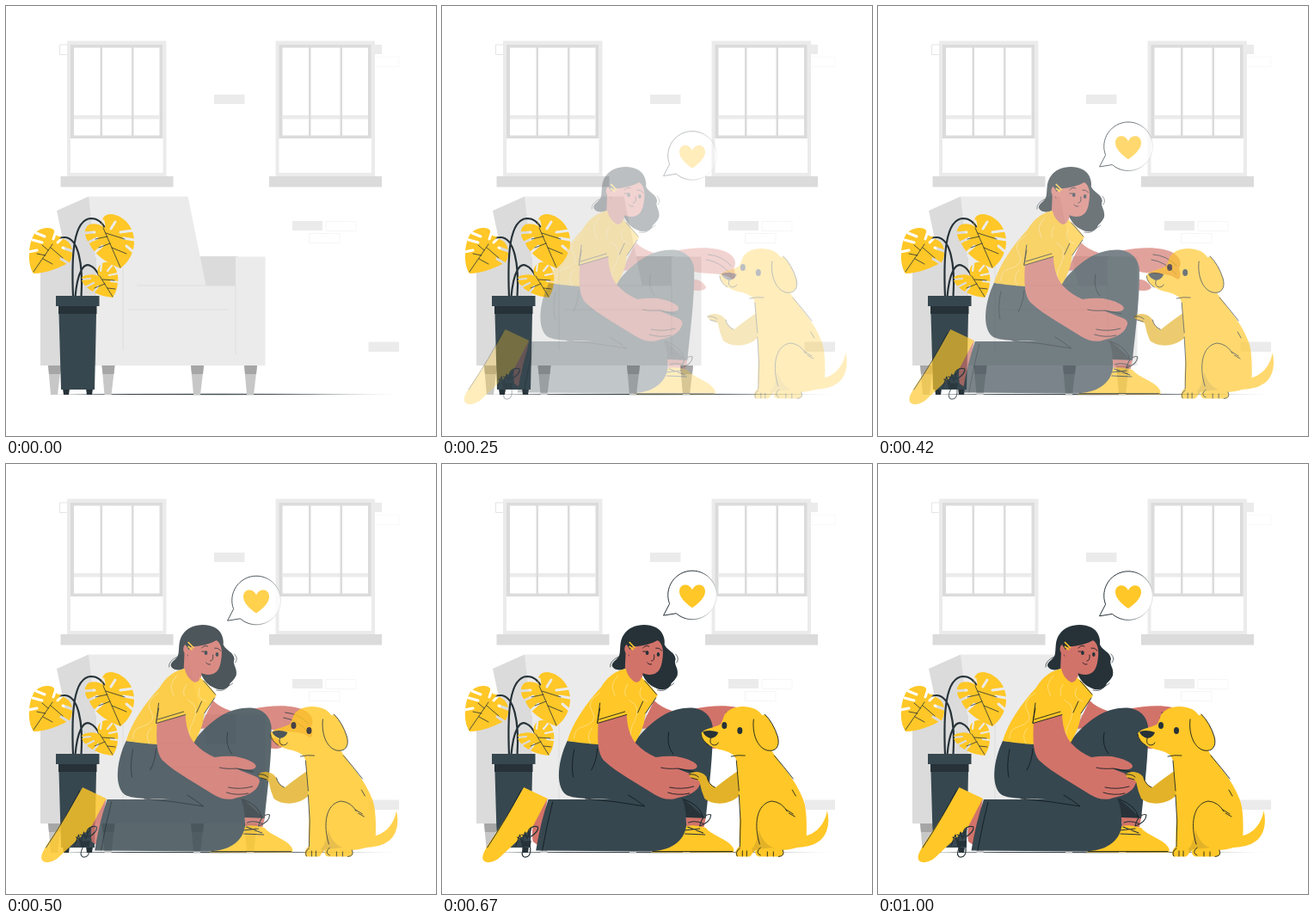
Recreate the animation shown at these times as an HTML page. Size 500 px wide and 500 px high, loop 1040 ms.

```html
<!DOCTYPE html>
<html lang="en">
<head>
<meta charset="utf-8">
<title>Woman and dog</title>
<style>
html, body { margin: 0; width: 100%; height: 100%; overflow: hidden; background: #fff; }
svg { display: block; width: 100%; height: 100%; }
.pale { fill: #ebebeb; }
.grey { fill: #dbdbdb; }
.dark { fill: #263238; }
.slate { fill: #37474f; }
.sun { fill: #ffc727; }
.shade { fill: #e3b228; }
.skin { fill: #d2736a; }
.line, .ink, .print, .edge { fill: none; stroke-linecap: round; stroke-linejoin: round; }
.line { stroke: #263238; }
.ink { stroke: #101a1f; stroke-width: .85; }
.print { stroke: #ffe08a; stroke-width: .8; }
.edge { stroke: #dbdbdb; stroke-width: .8; }
.clip { fill: none; stroke: #ffc727; stroke-width: 1.7; }
</style>
</head>
<body>
<svg viewBox="0 0 500 500">
<defs>
  <linearGradient id="fade">
    <stop stop-color="#dedede"/><stop offset="1" stop-color="#f8f8f8"/>
  </linearGradient>
  <linearGradient id="rim" gradientUnits="userSpaceOnUse" x1="257" y1="140" x2="321" y2="160">
    <stop offset=".5" stop-color="#263238"/><stop offset=".95" stop-color="#e0e2e3"/>
  </linearGradient>
  <linearGradient id="floor">
    <stop stop-color="#263238" stop-opacity=".15"/><stop offset=".12" stop-color="#263238"/>
    <stop offset=".65" stop-color="#263238" stop-opacity=".8"/><stop offset="1" stop-color="#263238" stop-opacity=".1"/>
  </linearGradient>
  <g id="window">
    <path class="pale" d="M71 40.500H186.500V198H71z"/>
    <path fill="#fff" d="M75 154H182.500V194H75z"/>
    <path class="grey" d="M75 45H182V154H75zM63.500 198H194.500V210.500H63.500z"/>
    <path fill="#fff" d="M79 48.500H178.500V150.500H79z"/>
    <path class="pale" d="M79 127H178.500V131.500H79z"/>
    <path class="grey" d="M109.500 48H112V151H109.500zM146 48H148.500V151H146z"/>
  </g>
  <g id="foot">
    <path fill="#c7c7c7" d="M0 418H15L11 452H3z"/>
    <path fill="#a6a6a6" d="M0 418H15L14 428H1z"/>
  </g>
  <!-- slits cut out of the leaves -->
  <mask id="slits" maskUnits="userSpaceOnUse" x="0" y="220" width="170" height="140">
    <path fill="#fff" d="M0 220H170V360H0z"/>
    <g fill="none" stroke="#000" stroke-width="3" stroke-linecap="round">
      <path d="M31 272L42 275M26 286L36 284M35 264L45 268M58 262L55 271M66 269L60 275M77 285L66 281M72 299L64 294"/>
      <path d="M90 264L103 263M93 276L106 270M103 287L112 279M148 261L133 263M149 272L137 270M147 285L140 279M113 250L114 256M127 251L122 259"/>
      <path stroke-width="2.200" d="M88 318L98 317M92 327L102 322M101 334L107 326M130 311L120 313M130 321L122 320M111 300L110 308M123 302L118 308"/>
    </g>
  </mask>
</defs>

<!-- room -->
<path class="pale" d="M242 103H277.500V114H242zM333 250H368V261H333zM428 45H437V56H428zM421.500 390.500H457V402H421.500z"/>
<path fill="none" stroke="url(#fade)" stroke-width=".8" d="M372 250.500H407V261.500H372zM352.500 264.500H388V275.500H352.500zM428 59H457V70.500H428zM62.500 45H73V56.500H62.500z"/>
<use href="#window"/><use href="#window" x="242.500"/>
<path fill="url(#floor)" d="M42 451.500Q250 450 457 451.500Q250 453 42 451.500z"/>

<!-- armchair -->
<use href="#foot" x="49"/><use href="#foot" x="111.500"/><use href="#foot" x="215"/><use href="#foot" x="277"/>
<path class="grey" d="M59 238L96 221.500 120 300H72zM226 291H270V326H226z"/>
<path class="pale" d="M96 221.500H211.500L232.500 325H267V291.500H301.500V418H40V292H104z"/>
<path class="grey" d="M40 292H105V418H40z"/>
<path class="edge" d="M136 300V400M267 325V405M153 325H267M143 353H258"/>

<!-- plant -->
<path class="line" stroke-width="2.200" d="M78 338C76 290 78 248 99 247Q110 247 116 260M87.500 338C90 300 84 268 67 269Q58 269 54 277M80.500 338C83 310 90 298 98 302Q104 304 109 315"/>
<g class="sun" mask="url(#slits)">
  <path d="M32 311C25 301 25 278 33 265C39 257 53 256 56 261Q56 268 63 268Q67 271 72 274C79 280 78 292 74 298C63 304 47 311 32 311z"/>
  <path d="M133 305C119 300 102 289 97 276C90 268 90 258 97 254Q106 252 112 256C110 248 114 242 122 242C136 243 148 256 149 271C150 285 143 298 133 305z"/>
  <path d="M124 339C110 338 96 331 91 324C86 318 87 314 94 313Q102 311 108 314C104 306 109 298 117 298C126 299 132 310 130 322Q129 332 124 339z"/>
</g>
<g class="line" stroke-width=".8">
  <path d="M32 309L54 277M52 281L66 293M46 290L36 288M43 294L54 300M49 284L42 278"/>
  <path d="M133 304L113 258M116 264L138 271M121 276L108 281M123 281L140 288M118 268L104 271"/>
  <path d="M124 338L109 314M112 318L126 319M115 323L103 328M118 328L127 329"/>
</g>
<path class="dark" d="M61 348H105.500V358H61zM66 445H74L73 452H67zM93 445H101L100 452H94z"/>
<path class="slate" d="M58 337H108.500V349H58zM61.500 358H105L103 446H64z"/>

<g id="bubble">
  <path fill="#fff" stroke="url(#rim)" stroke-linejoin="round" d="M264.600 163.200A28.300 28.300 0 1 1 272.400 174.400L257.500 176.800z"/>
  <path class="sun" d="M291 168C282 162 276 155 276 149C276 139.500 287.500 138.500 291 147C294.500 138.500 306 139.500 306 149C306 155 300 162 291 168z"/>
</g>

<g id="woman">
  <!-- far arm and hand -->
  <path class="skin" d="M246 275Q254 283 267 287L242 307 230 308zM290 285C318 279 344 280 355 288C363 294 363 300 360 305C363 312 362 320 357 317C346 308 326 314 308 307zM311 319C317 316 324 320 328 327C327 331 318 332 310 330z"/>
  <path class="ink" d="M330 289Q346 290 357 302M328 295Q344 297 357 312"/>
  <!-- hair and head -->
  <path class="dark" d="M211 198C218 187 236 184 248 190C256 194 259 203 258 210C262 218 270 218 271 227C268 233 275 237 273 246C271 250 269 252 266 255C264 263 254 264 247 260C240 257 236 252 233 246L214 237C208 241 198 240 197 234C198 228 205 228 206 220C207 211 206 205 211 198z"/>
  <path class="line" stroke-width=".7" d="M205 224Q194 229 195 236M259 256Q261 262 269 255M271 221Q276 226 272 231M262 260Q258 265 250 263"/>
  <path class="skin" d="M213 218L212 240 218 258 230 258 233 244z"/>
  <path class="skin" d="M219 212C230 213 243 209 250 205C257 209 257 220 255.500 228C254 239 250 245 240 245C231 244 223 239 219 231L217 222C210 221 210 210 216 209z"/>
  <path class="dark" d="M212 207Q231 196 251 204Q240 211 222 211L218 216z"/>
  <path class="clip" d="M217 207L224 214M217 212L222 216"/>
  <path class="dark" d="M236 219.500a1.900 2.500 0 1 0 3.800 0a1.900 2.500 0 1 0-3.800 0M249 221.500a1.800 2.400 0 1 0 3.600 0a1.800 2.400 0 1 0-3.600 0"/>
  <path class="ink" d="M233 214Q236 210 240 212M248 214Q252 213 255 217M246 222Q247 229 243 229M238 231Q240 234 243 233M233 218L236 218"/>
  <!-- feet -->
  <path class="skin" d="M112 399L122 389 112 444 105 439Q103 427 106 416zM282 407H307L304 422H284z"/>
  <path class="sun" d="M94.500 376L122 389C115 402 109 414 104 423C91 434 79 446 67 457C60 464 49 465 47 460C45 455 50 448 54 441C70 418 83 396 94.500 376z"/>
  <path class="sun" d="M242 451.500C258 446 273 432 279 422Q292 418 306 423C313 432 331 436 337 445Q340 449 338 451.500H242z"/>
  <path class="ink" d="M91 380Q77 408 52 446M244 450.500H337"/>
  <path class="line" stroke-width="1.200" d="M85 444L90 431 92 441 96 428 98 436 103 424M87 434L96 440M92 431L102 434M101 432C96 424 106 420 111 422Q112 427 103 433M95 445Q90 455 95 457Q103 458 102 446"/>
  <path class="dark" d="M92 439L103 438 102 445H92z"/>
  <path class="line" stroke-width="1.100" d="M281 426L299 424M285 422L303 429M282 430L305 431M299 421C301 411 308 406 312 408Q312 416 299 421M286 417Q293 414 303 418"/>
  <!-- trousers -->
  <path class="slate" d="M145 322C134 345 131 374 143 384C150 389 166 389 196 390H123Q114 416 108.500 449.500L240 450.500C264 450 281 440 283.500 420L283 411L306 412C310 375 315 335 314 305C312 289 298 281 280 284C257 287 239 304 228 317Q222 325 212 328z"/>
  <path class="dark" d="M278 388Q290 397 304 411L283 411Q283 400 278 388z"/>
  <path class="ink" d="M153 332Q149 351 152 364M180 331Q179 346 173 356M166 389Q200 392 235 398Q225 390 216 385M128 393Q121 421 116 449M268 337Q260 327 263 312M281 390Q300 397 303 411"/>
  <!-- shirt -->
  <path class="sun" d="M213 238C200 241 191 248 184 260C166 279 151 302 145 322Q180 328 222 327Q230 315 234 302L236 290L250 269Q241 256 231 248Q231 253 225 254Q216 250 213 238z"/>
  <path class="print" d="M204 246Q194 257 199 265T190 286M183 266Q166 276 174 288T162 306Q153 308 153 319M215 256Q207 270 219 276T223 300Q216 310 220 324M231 260Q225 272 238 276M174 307Q166 315 172 325"/>
  <path class="ink" d="M233 276L227 289M248 272L236 290M235 252L249 268M183 278L180 301"/>
  <!-- near arm -->
  <path class="skin" d="M181 300C180 322 180 338 189 346C203 359 229 373 246 384C254 389 264 392 274 388C286 386 297 380 299 373Q303 366 295 363L272 354C283 355 294 357 296 352C297 347 283 342 272 340Q260 339 248 341Q234 335 225 325Q215 314 214 291z"/>
  <path class="sun" d="M188 270L180 301.500 214 291.500 217 270z"/>
  <path class="ink" d="M183 284L180 301.500 214 291.500M182 297L212 288M254 353Q261 355 274 354L293 358M264 376Q278 379 292 375M262 382Q274 386 287 383"/>
</g>

<g id="dog">
  <!-- raised paw -->
  <path class="shade" d="M352 352Q331 366 319 376Q312 374 309 365C305 357 292 356 288 361C287 365 296 366 300 369Q302 380 306 389C315 397 337 398 350 382z"/>
  <path class="ink" d="M288 361Q295 360 299 364M291 365L298 367M309 365Q311 373 318 376"/>
  <!-- tail, body, head -->
  <path class="sun" d="M415 433C433 434 446 420 448.500 403C452 417 449 431 440 438Q430 446 410 446z"/>
  <path class="shade" d="M348 385L347 444Q340 450 343 456H358L375 440V385z"/>
  <path class="sun" d="M329 292C335 282 351 279 365 285C376 291 383 308 383 332C392 347 412 366 421 391Q426 405 424 442Q411 448 397 449Q400 455 394 456.500H369Q363 455 366 447L361 446Q363 455 358 456.500H344Q341 452 347 446C345 425 349 410 346 385Q344 364 343 345Q341 336 328 333C312 330 302 322 302 314C304 307 319 307 325 302Q327 298 329 292z"/>
  <path class="shade" d="M362 447Q368 437 369 425Q374 442 386 446L367 448z"/>
  <path class="sun" stroke="#101a1f" stroke-width=".9" stroke-linecap="round" d="M363 297C361 313 367 330 379 333C389 335 394 328 391 317Q386 301 376 291"/>
  <path class="dark" d="M304 311.500Q312 308.500 322 312Q320 318 313 319Q306 317 304 311.500zM326 304a3 4 0 1 0 6 0a3 4 0 1 0-6 0M344 310a3 4 0 1 0 6 0a3 4 0 1 0-6 0"/>
  <path class="ink" d="M313 319Q311 326 317 327Q321 327 322 324M302 314Q303 322 311 327M337 340Q345 338 353 339M343 345L346 380M346 385Q349 415 347 445M370 442C363 420 366 395 384 392Q396 393 402 404M401 402L409 407M404 406L411 410M408 379L412 386M387 339Q399 353 409 366M344 456Q341 451 347 447M350 456V450M355 456V450M371 455Q364 452 371 446M379 456V451M386 456V451M397 449Q400 456 392 456.500"/>
</g>
</svg>
<script>
const LOOP = 1040, FRAME = 1000 / 24, SLIDE = 30;
const el = id => document.getElementById(id);
const woman = el('woman'), dog = el('dog'), bubble = el('bubble');

const bezier = (a, b, s) => 3 * (1 - s) ** 2 * s * a + 3 * (1 - s) * s * s * b + s ** 3;

// cubic-bezier(.36, -.01, .5, 1.38): overshoots, then settles
function ease(x) {
  if (x >= 1) return 1;
  let low = 0, high = 1;
  for (let i = 0; i < 24; i++) {
    const mid = (low + high) / 2;
    if (bezier(.36, .5, mid) < x) low = mid; else high = mid;
  }
  return bezier(-.01, 1.38, low);
}

function place(part, x, y, opacity) {
  part.setAttribute('transform', `translate(${x} ${y})`);
  part.setAttribute('opacity', opacity);
}

function draw(now) {
  const step = Math.floor((now % LOOP + 4) / FRAME);
  const p = step < 2 ? 0 : ease((step + 1) / 24);
  const gap = SLIDE * (1 - p), opacity = Math.min(1, Math.max(0, p));
  place(woman, -gap, 0, opacity);
  place(dog, gap, 0, opacity);
  place(bubble, 0, gap, opacity);
}

const start = performance.now();
function tick() {
  draw(performance.now() - start);
  requestAnimationFrame(tick);
}
tick();
</script>
</body>
</html>
```
